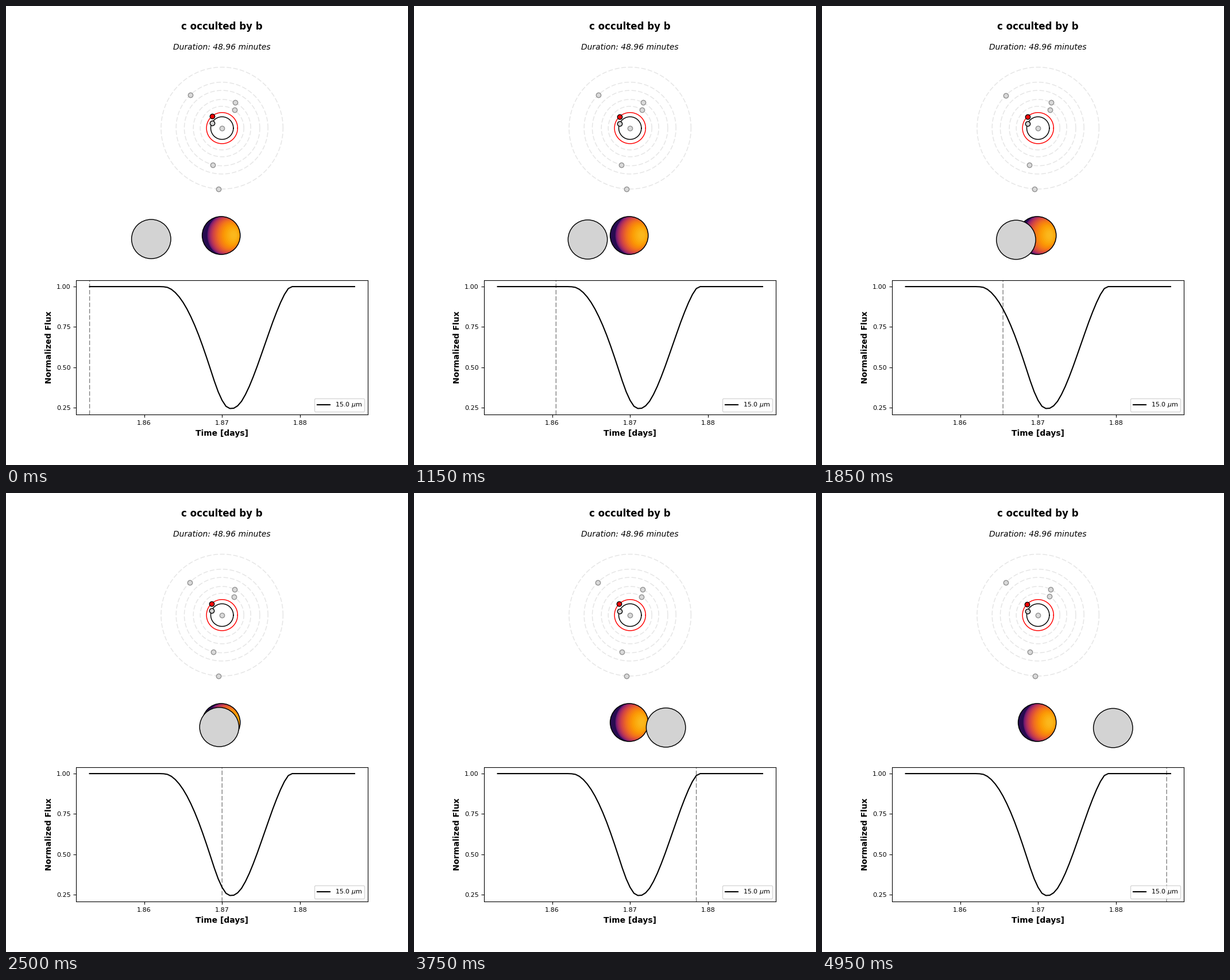
A matplotlib script that plays this animation: 700x800 px, repeating every 5000 ms.

```python
import numpy as np
import matplotlib.pyplot as plt
from matplotlib.animation import FuncAnimation
from matplotlib.patches import Circle

W, H, DPI = 700, 800, 100
SLOTS, SLOT_MS = 100, 50
T0, DT, STEPS = 1.853, 0.0005, 69
DASH = (0, (5.55, 2.4))
SUN = (376.2, 212.8)
ORB = (374.7, 400.0, 33.1)

# orbit radius (px), starting angle (deg), period (days), line, fill, edge
PLANETS = [
    (106.2, 266.4, 18.77, None, "#d9d9d9", "#929292"),
    (80.0, 133.9, 12.35, None, "#d9d9d9", "#929292"),
    (65.7, 256.1, 9.21, None, "#d9d9d9", "#929292"),
    (50.0, 62.7, 6.10, None, "#d9d9d9", "#929292"),
    (38.0, 55.5, 4.05, None, "#d9d9d9", "#929292"),
    (27.1, 130.4, 2.42, "red", "red", "black"),
    (19.7, 153.3, 1.51, "black", "lightgray", "black"),
]

# flux from the first to the last contact, one value per time step
DIP_START = 19
DIP = [
    .999, .995, .983, .963, .936, .902, .861, .813, .759, .699, .633, .563,
    .490, .416, .349, .296, .259, .2454, .247, .262, .290, .332, .383, .442,
    .506, .574, .643, .712, .780, .843, .901, .951, .988,
]

plt.rcParams["font.family"] = "DejaVu Sans"
fig = plt.figure(figsize=(W / DPI, H / DPI), dpi=DPI, facecolor="white")


def orbit_point(radius, degrees):
    a = np.radians(degrees)
    return SUN[0] + radius * np.cos(a), SUN[1] - radius * np.sin(a)


def surface(size=280, phase=39.7, bands=34):
    """Colours of a sphere lit from the right, in bands of equal zenith angle."""
    x, y = np.meshgrid(*[np.linspace(-1, 1, size)] * 2)
    z = np.sqrt(np.clip(1 - x**2 - y**2, 0, None))
    a = np.radians(phase)
    zenith = np.arccos(np.clip(x * np.sin(a) + z * np.cos(a), -1, 1))
    zenith = np.round(zenith / np.pi * bands) * np.pi / bands
    light = np.clip(np.cos(zenith), 0, 1) ** 0.6
    return plt.get_cmap("inferno")(0.14 + 0.7 * light)


# light curve
ax = fig.add_axes([122.5 / W, 87.6 / H, 507.5 / W, 234.4 / H])
times = T0 + DT * np.arange(STEPS)
flux = np.ones(STEPS)
flux[DIP_START:DIP_START + len(DIP)] = DIP
ax.plot(times, flux, "k-", lw=1.5, label=r"15.0 $\mu$m")
now = ax.axvline(T0, color="black", alpha=0.5, lw=1, ls=DASH, snap=False)
ax.set_xlim(1.8513, 1.8887)
ax.set_ylim(0.2067, 1.0393)
ax.set_xticks([1.86, 1.87, 1.88], ["1.86", "1.87", "1.88"])
ax.set_yticks([0.25, 0.5, 0.75, 1], ["0.25", "0.50", "0.75", "1.00"])
ax.tick_params(labelsize=8)
ax.set_xlabel("Time [days]", fontsize=10, fontweight="bold")
ax.set_ylabel("Normalized Flux", fontsize=10, fontweight="bold")
ax.legend(loc="lower right", fontsize=8)

# pixel canvas for everything above the plot
sky = fig.add_axes([0, 0, 1, 1])
sky.axis("off")
sky.text(376.25, 41, "c occulted by b", fontsize=12, fontweight="bold", ha="center")
sky.text(376.25, 76, "Duration: 48.96 minutes", fontsize=10, style="italic", ha="center")

turn = np.linspace(0, 360, 361)
markers = []
for radius, angle, period, line, fill, edge in PLANETS:
    sky.plot(*orbit_point(radius, turn), color=line or "#e5e5e5", lw=1.05,
             ls="-" if line else DASH, zorder=2 if line else 1)
    markers += sky.plot([], [], "o", ms=6, mfc=fill, mec=edge, mew=1, zorder=3)
sky.plot(*SUN, "o", ms=6, mfc="#d9d9d9", mec="#929292", mew=1, zorder=3)

cx, cy, r = ORB
glow = sky.imshow(surface(), extent=(cx - r, cx + r, cy + r, cy - r),
                  aspect="auto", zorder=4)
glow.set_clip_path(Circle((cx, cy), r, transform=sky.transData))
sky.add_patch(Circle((cx, cy), r, fill=False, ec="black", lw=1.1, zorder=5))
disc = Circle((0, 0), 34.2, fc="lightgray", ec="black", lw=1.05, zorder=6)
sky.add_patch(disc)
sky.set_xlim(0, W)
sky.set_ylim(H, 0)


def draw(slot):
    # 15 time steps for every 22 slots; the first step is held once
    step = max((15 * slot + 20) // 22 - 1, 0)
    t = step * DT
    now.set_xdata([T0 + t, T0 + t])
    disc.center = (252.8 + 3.175 * step + 0.0092 * step**2, 406.2 + 0.051 * step)
    for marker, (radius, angle, period, *_) in zip(markers, PLANETS):
        x, y = orbit_point(radius, angle + 360 * t / period)
        marker.set_data([x], [y])
    return [now, disc, *markers]


anim = FuncAnimation(fig, draw, frames=SLOTS, interval=SLOT_MS,
                     repeat=True, repeat_delay=0, blit=False)
plt.show()
```
